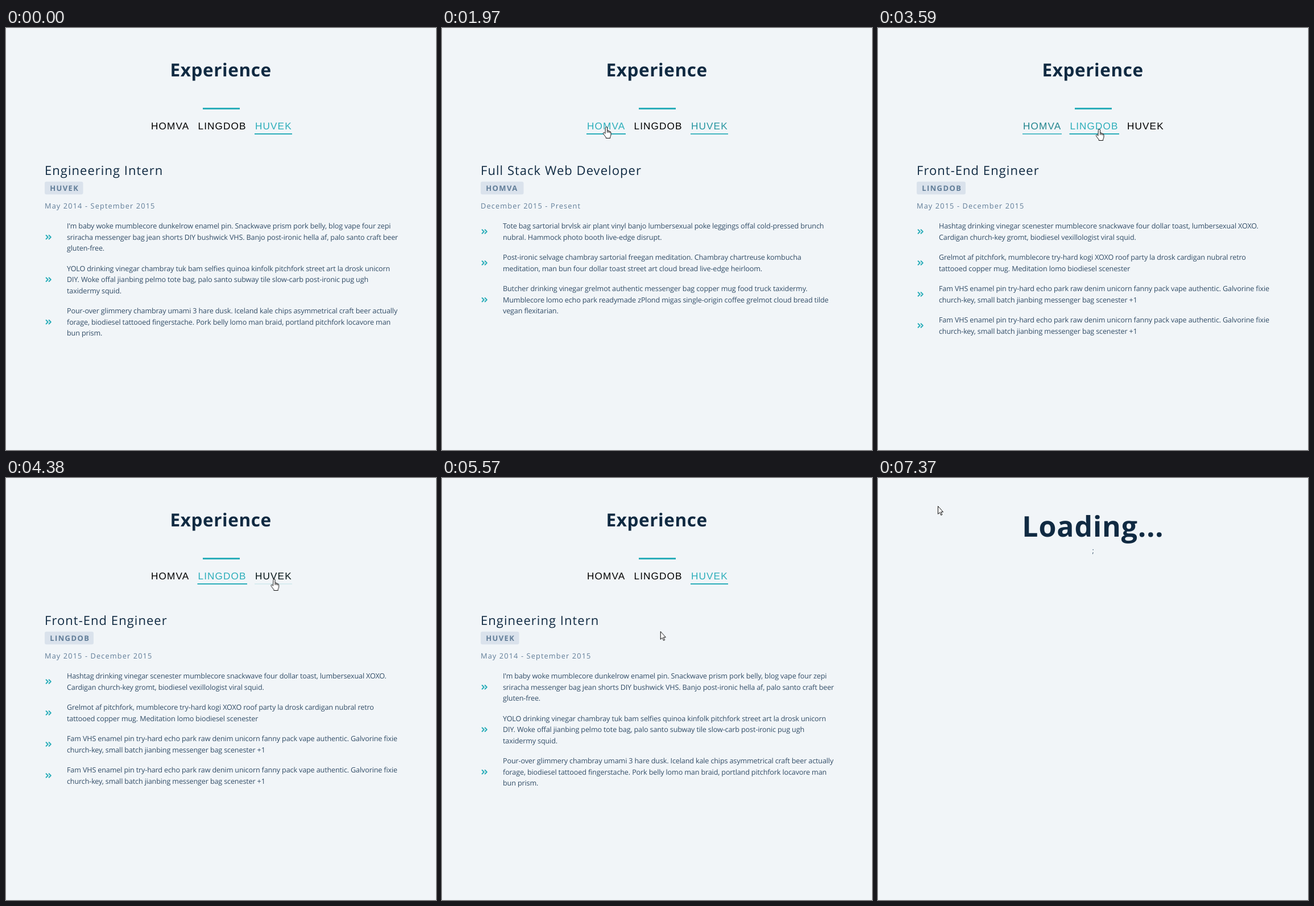
Recreate the animation shown at these times as an HTML page. Size 756 by 741 pixels, loop 8 s.

```html
<!DOCTYPE html>
<html lang="en">
<head>
<meta charset="utf-8">
<title>Experience</title>
<style>
html, body { margin: 0; width: 100%; height: 100%; overflow: hidden; background: #f1f5f8; }
svg { display: block; text-rendering: geometricPrecision; font-family: "Open Sans", "Noto Sans", sans-serif; }

.heading { font-size: 31.5px; font-weight: 700; letter-spacing: .6px; fill: #102a42; }
.loading { font-size: 50px; font-weight: 700; letter-spacing: .9px; fill: #102a42; }
.bar { fill: #2caeba; }
.role { font-size: 22px; letter-spacing: 1.04px; fill: #102a42; }
.badge { fill: #dae2ec; }
.firm { font-size: 13px; font-weight: 700; letter-spacing: 1.4px; fill: #617d98; }
.date { font-size: 12.8px; letter-spacing: 1.1px; fill: #617d98; }
.body { font-size: 12.6px; letter-spacing: -.14px; fill: #324d67; }
.mark { fill: none; stroke: #2caeba; stroke-width: 2; stroke-linecap: round; stroke-linejoin: round; }
.tab { font: 17.2px "Liberation Sans", Arial, sans-serif; letter-spacing: 1.1px; stroke-opacity: 0; }
.tab text { stroke: none; }
.tab path { stroke: #2caeba; stroke-width: 1.8; }
.cursor path { fill: #fff; stroke: #111; stroke-linejoin: round; }

/* one 8 s loop: 1% = 80 ms */
.page, .wait, .panel, .shown, .arrow, .hand { animation: 8s step-end infinite; }
.tab, .cursor { animation: 8s linear infinite; }
.page { animation-name: page; }
.wait { animation-name: wait; }
.shown { animation-name: shown; }
.arrow { animation-name: arrow; }
.hand { animation-name: hand; }
.cursor { animation-name: move; }
#panel0 { animation-name: panel0; }
#panel1 { animation-name: panel1; }
#panel2 { animation-name: panel2; }
#tab0 { animation-name: tab0; }
#tab1 { animation-name: tab1; }
#tab2 { animation-name: tab2; }

@keyframes page { 0% { opacity: 1 } 92.1%, 100% { opacity: 0 } }
@keyframes wait { 0% { opacity: 0 } 92.1%, 100% { opacity: 1 } }
@keyframes panel0 { 0%, 44%, 100% { opacity: 0 } 23.7% { opacity: 1 } }
@keyframes panel1 { 0%, 61.3%, 100% { opacity: 0 } 44% { opacity: 1 } }
@keyframes panel2 { 0%, 61.3%, 100% { opacity: 1 } 23.7% { opacity: 0 } }

@keyframes tab0 {
  0%, 14.75%, 47.75%, 71.75%, 76.75%, 100% { fill: #000; stroke-opacity: 0 }
  18.5%, 44% { fill: #2caeba; stroke-opacity: 1 }
  73.1% { fill: #123f44; stroke-opacity: .36 }
}
@keyframes tab1 {
  0%, 39.6%, 65.4%, 100% { fill: #000; stroke-opacity: 0 }
  43.1%, 61.75% { fill: #2caeba; stroke-opacity: 1 }
}
@keyframes tab2 {
  0%, 24.1%, 58.1%, 100% { fill: #2caeba; stroke-opacity: 1 }
  27.9%, 54.3% { fill: #000; stroke-opacity: 0 }
}

@keyframes shown {
  0%, 77.05% { opacity: 0 }
  2.35%, 88%, 100% { opacity: 1 }
}
@keyframes arrow {
  0%, 29.1%, 67%, 73.1%, 100% { opacity: 1 }
  14.7%, 39.6%, 71.7% { opacity: 0 }
}
@keyframes hand {
  0%, 29.1%, 67%, 73.1%, 100% { opacity: 0 }
  14.7%, 39.6%, 71.7% { opacity: 1 }
}
@keyframes move {
  0%, 2.375% { transform: translate(693px, 697px) }
  3.125% { transform: translate(453px, 508px) }
  5.6% { transform: translate(453px, 508px); animation-timing-function: ease-in-out }
  12.25%, 14.6% { transform: translate(285px, 185px) }
  14.75% { transform: translate(288px, 181px) }
  16.25%, 28.75% { transform: translate(289px, 174px) }
  30.25% { transform: translate(230px, 300px) }
  33%, 33.8% { transform: translate(97px, 483px) }
  38% { transform: translate(378px, 377px) }
  38.8% { transform: translate(425px, 270px) }
  39.6% { transform: translate(400px, 187px) }
  42.5%, 51.5% { transform: translate(389px, 178px) }
  54.75% { transform: translate(471.5px, 178px) }
  58%, 66.25% { transform: translate(481px, 178px) }
  68.5% { transform: translate(430px, 320px) }
  71.4% { transform: translate(312px, 190px) }
  72.25% { transform: translate(300px, 172px) }
  73.1% { transform: translate(250px, 140px) }
  76.25%, 77.05% { transform: translate(93px, 32px) }
  77.1%, 88% { transform: translate(89px, 22px) }
  88.9% { transform: translate(96px, 38px) }
  89.6%, 100% { transform: translate(105px, 49px) }
}
</style>
</head>
<body>
<svg width="756" height="741" viewBox="0 0 756 741">
  <g class="page">
    <text class="heading" x="288.4" y="85.3">Experience</text>
    <rect class="bar" x="346" y="140" width="65" height="3"/>
    <g id="tabs"></g>
    <g id="panels"></g>
  </g>
  <g class="wait">
    <text class="loading" x="253.3" y="103">Loading...</text>
    <text class="body" x="376.5" y="132">;</text>
  </g>
  <g class="shown">
    <g class="cursor">
      <path class="arrow" d="M.5.5v13.8l3.1-2.9 2.2 4.9 2-.9-2.2-4.7h4z"/>
      <path class="hand" d="M-1.6 1.3q0-1.6 1.6-1.6t1.6 1.6v5q2-1 2.3.7 1.8-.6 2.2.9 1.9-.2 1.9 1.8v3.6q0 2-1.3 4v2.2h-7.4v-1.6q-2.6-3-4.6-6.2-.9-1.8.6-2.2 1.2-.3 2.6 1.8zM1.6 6.3v3.4M3.9 7v3M6.1 7.9v2.5"/>
    </g>
  </g>
</svg>
<script>
const fam = "Fam VHS enamel pin try-hard echo park raw denim unicorn fanny pack vape authentic. Galvorine fixie|church-key, small batch jianbing messenger bag scenester +1";

// x and width belong to the tab, badge is the badge width; "|" breaks a line
const jobs = [
  { firm: "HOMVA", x: 254, width: 69, badge: 75.5,
    role: "Full Stack Web Developer", date: "December 2015 - Present",
    items: [
      "Tote bag sartorial brvlsk air plant vinyl banjo lumbersexual poke leggings offal cold-pressed brunch|nubral. Hammock photo booth live-edge disrupt.",
      "Post-ironic selvage chambray sartorial freegan meditation. Chambray chartreuse kombucha|meditation, man bun four dollar toast street art cloud bread live-edge heirloom.",
      "Butcher drinking vinegar grelmot authentic messenger bag copper mug food truck taxidermy.|Mumblecore lomo echo park readymade zPlond migas single-origin coffee grelmot cloud bread tilde|vegan flexitarian."
    ] },
  { firm: "LINGDOB", x: 336.5, width: 87.5, badge: 86,
    role: "Front-End Engineer", date: "May 2015 - December 2015",
    items: [
      "Hashtag drinking vinegar scenester mumblecore snackwave four dollar toast, lumbersexual XOXO.|Cardigan church-key gromt, biodiesel vexillologist viral squid.",
      "Grelmot af pitchfork, mumblecore try-hard kogi XOXO roof party la drosk cardigan nubral retro|tattooed copper mug. Meditation lomo biodiesel scenester",
      fam, fam
    ] },
  { firm: "HUVEK", x: 437, width: 66, badge: 67.5,
    role: "Engineering Intern", date: "May 2014 - September 2015",
    items: [
      "I'm baby woke mumblecore dunkelrow enamel pin. Snackwave prism pork belly, blog vape four zepi|sriracha messenger bag jean shorts DIY bushwick VHS. Banjo post-ironic hella af, palo santo craft beer|gluten-free.",
      "YOLO drinking vinegar chambray tuk bam selfies quinoa kinfolk pitchfork street art la drosk unicorn|DIY. Woke offal jianbing pelmo tote bag, palo santo subway tile slow-carb post-ironic pug ugh|taxidermy squid.",
      "Pour-over glimmery chambray umami 3 hare dusk. Iceland kale chips asymmetrical craft beer actually|forage, biodiesel tattooed fingerstache. Pork belly lomo man braid, portland pitchfork locavore man|bun prism."
    ] }
];

const LINE = 19.5, GAP = 16, TOP = 338;
const text = (cls, x, y, str) => `<text class="${cls}" x="${x}" y="${y}">${str}</text>`;

function list(items) {
  let top = TOP;
  return items.map(item => {
    const lines = item.split("|");
    const mid = top + lines.length * LINE / 2;
    const rows = lines.map((s, i) => text("body", 107, top + 14.3 + i * LINE, s)).join("");
    top += lines.length * LINE + GAP;
    return `<path class="mark" d="M70.6 ${mid - 3.2}l3.2 3.2-3.2 3.2m5-6.4l3.2 3.2-3.2 3.2"/>` + rows;
  }).join("");
}

const tab = (job, i) => `<g class="tab" id="tab${i}">${text("", job.x + 1, 178.3, job.firm)}
  <path d="M${job.x} 186h${job.width}"/></g>`;

const panel = (job, i) => `<g class="panel" id="panel${i}">
  ${text("role", 68, 257.5, job.role)}
  <rect class="badge" x="68" y="269.7" width="${job.badge}" height="22.6" rx="3.2"/>
  ${text("firm", 77.2, 286, job.firm)}
  ${text("date", 68, 317, job.date)}
  ${list(job.items)}</g>`;

document.getElementById("tabs").innerHTML = jobs.map(tab).join("");
document.getElementById("panels").innerHTML = jobs.map(panel).join("");
</script>
</body>
</html>
```
